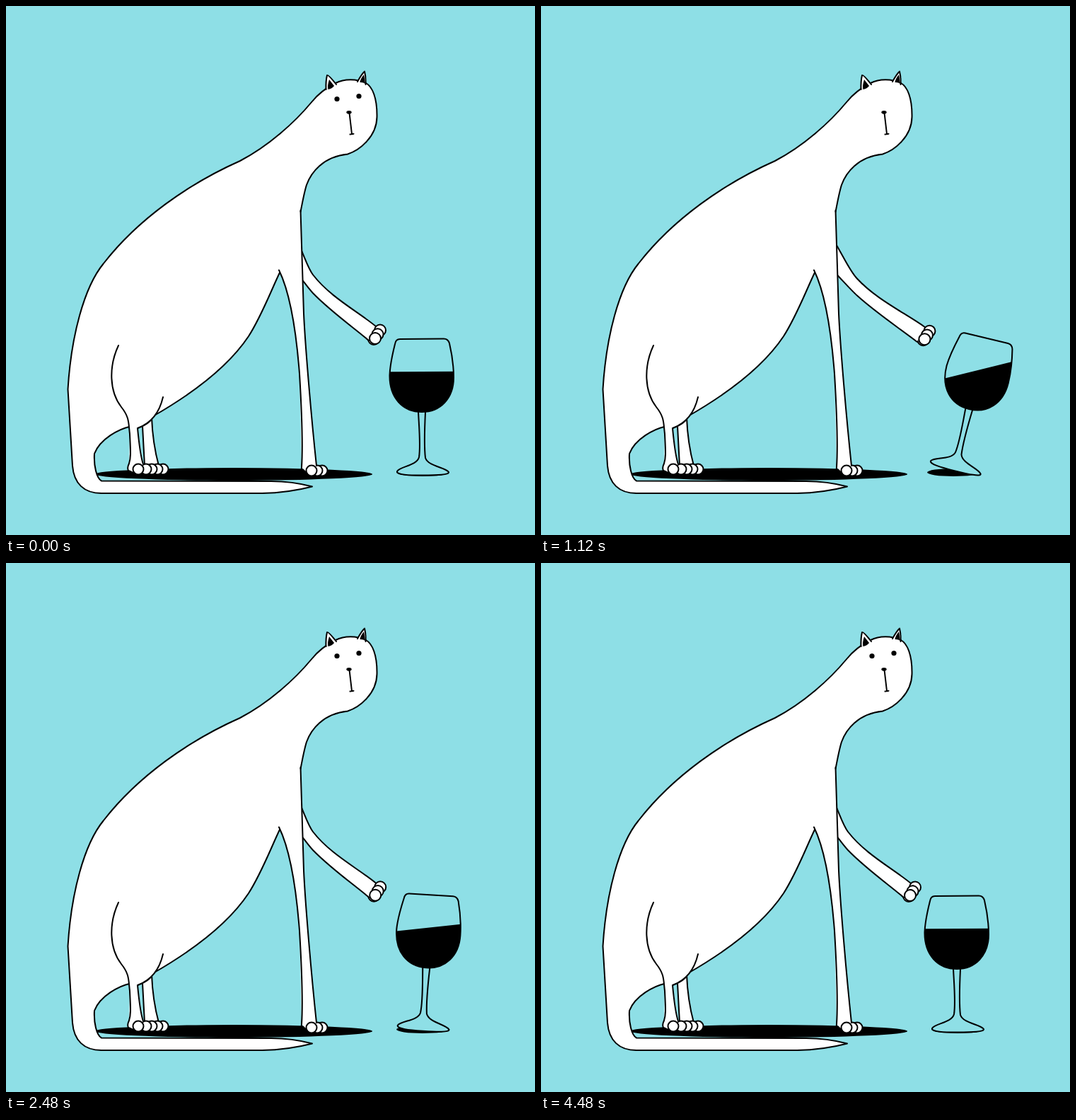
Write an HTML page that moves like this. It is 748 px wide and 748 px high and loops after 5200 ms.

```html
<!DOCTYPE html>
<html lang="en">
<head>
<meta charset="utf-8">
<title>Cat and glass</title>
<style>
  html, body { margin: 0; width: 100%; height: 100%; overflow: hidden; background: #8edfe6; }
  svg { display: block; width: 100vw; height: 100vh; }
  .line { fill: none; stroke: #000; stroke-width: 2; stroke-linecap: round; stroke-linejoin: round; }
  .white { fill: #fff; }
  .teal { fill: #8edfe6; }
  .bare { stroke: none; }
  .open { fill: none; }
</style>
</head>
<body>
<svg viewBox="0 0 748 748">
  <defs>
    <path id="bowl" d="M557 471 L619 470.5 Q625 470.5 627 477 C630 490 633 508 633 525 C633 555 614 574 588 574 C561 574 542 554 542.5 522 C543 506 547 490 550 478 Q551 471 557 471 Z"/>
    <clipPath id="inBowl"><use href="#bowl"/></clipPath>
    <path id="thigh" d="M159 480 C145 510 146 545 163 567 C175 582 173 590 175 605 C176 628 177 638 174 647 C169 657 175 663 186 662 M194 648 C190 636 188 618 186 597 C205 590 217 575 222 553"/>
    <path id="foreleg" d="M386 373.5 C400 402 410 455 415 520 C418 570 420 620 418 652 C417 661 421 664 430 664 M439 650 C432 585 423 480 421 435 L416.5 289"/>
  </defs>

  <ellipse cx="322" cy="662" rx="196" ry="9"/>
  <ellipse id="glassShadow" cx="589" cy="659.5" rx="37" ry="5.5"/>

  <g id="glass">
    <path class="line teal" d="M583 574 C584 595 586.5 622 584 638 C581 650 557 651 553 658 C552 663 570 663.5 589 663.5 C610 663.5 627 663 626 659 C621 652 597 651 593 639 C591 622 592 595 593 574"/>
    <use href="#bowl" class="line teal"/>
    <g clip-path="url(#inBowl)"><rect id="wine" x="500" y="517" width="180" height="90"/></g>
  </g>

  <g class="line white">
    <g id="palm"></g>
    <path id="arm"/>
    <g id="paw"></g>
  </g>

  <!-- far hind leg -->
  <path class="line white" d="M193 594 C194 612 195 630 196 650 L216 650 C210 628 207 608 206 582"/>
  <path id="body" class="line white"/>

  <g class="line white">
    <g id="hindToes"></g>
    <path class="bare" d="M159 480 C145 510 146 545 163 567 C175 582 173 590 175 605 L174 647 L172 655 L186 662 L194 648 L186 597 C205 590 217 575 222 553 Z"/>
    <use href="#thigh" class="open"/>
    <circle cx="187" cy="655" r="7.5"/>
  </g>

  <g class="line white">
    <g id="foreToes"></g>
    <path class="bare" d="M386 373.5 C400 402 410 455 415 520 L418 652 L430 664 L439 650 C432 585 423 480 421 435 L416.5 289 Z"/>
    <use href="#foreleg" class="open"/>
    <circle cx="432" cy="657" r="7.5"/>
  </g>

  <!-- ears and face -->
  <path class="line white" d="M452.5 118 Q452 106 454 98 Q456 97 467 111"/>
  <path class="line white" d="M497 107 Q503 96 507 92.5 Q509 100 508.5 111"/>
  <path d="M457 104 Q454 113 455.5 118 Q461 117 464 113 Z"/>
  <path d="M506 97 Q500.5 104 500.5 108 Q505 107.5 508 110 Z"/>
  <g id="eyes">
    <circle cx="468" cy="131.5" r="3.6"/>
    <circle cx="499" cy="127.5" r="3.6"/>
  </g>
  <ellipse cx="485" cy="150.3" rx="3.6" ry="2.4"/>
  <path class="line" d="M485.5 151 L489 181 M486.5 181.5 L491.5 180.7"/>
</svg>

<script>
const LOOP = 5200, STEP = 80, BLINK = 160;
const $ = id => document.getElementById(id);

// Turning points [time, value]; motion between them follows half a cosine.
const reach = [[80, 0], [700, 1.02], [1320, 0]];
const flick = [[1760, 0], [2020, -3], [2560, 0]];
const tilt = [[220, 0], [720, 19.5], [800, 19.5], [1840, -6.3], [2280, 8], [2740, -2.5], [3040, 0]];
const slide = [[700, 0], [1300, -7.5], [1800, -7.5], [2400, 0]];
const slosh = [[80, 0], [900, -14], [1020, -14.5], [1820, 12.5], [2340, -9], [2760, 4], [3300, 0]];
const wag = [[2960, 0], [3240, 8.5], [3740, -6.6], [4120, 4], [4340, 0]];
const blinks = [240, 1120, 3040, 4320];

// Shoulder, elbow and wrist on both edges of the arm, and the paw.
const rest = { top: [[414, 337], [434, 380], [523, 453]], low: [[414, 381], [434, 406], [513, 473]], paw: [522, 470] };
const out = { top: [[414, 314], [486, 401], [608, 459]], low: [[414, 357], [493, 425], [590, 480]], paw: [607, 475] };

function at(track, t) {
  const i = track.findIndex(k => k[0] > t);
  if (i === 0) return track[0][1];
  if (i < 0) return track[track.length - 1][1];
  const [t0, v0] = track[i - 1], [t1, v1] = track[i];
  return v0 + (v1 - v0) * (1 - Math.cos(Math.PI * (t - t0) / (t1 - t0))) / 2;
}

const mix = (a, b, k) => a.map((v, i) => v + (b[i] - v) * k);
const dist = (a, b) => Math.hypot(b[0] - a[0], b[1] - a[1]);
const text = pts => pts.map(p => p.map(v => v.toFixed(2)).join(' ')).join(' ');

function spin([x, y], deg, [cx, cy]) {
  const a = deg * Math.PI / 180, c = Math.cos(a), s = Math.sin(a);
  return [cx + (x - cx) * c - (y - cy) * s, cy + (x - cx) * s + (y - cy) * c];
}

function addToes(id, x, y, count, gap, r = 7.5) {
  for (let i = 0; i < count; i++) {
    const toe = document.createElementNS('http://www.w3.org/2000/svg', 'circle');
    toe.setAttribute('cx', x - i * gap[0]);
    toe.setAttribute('cy', y - i * gap[1]);
    toe.setAttribute('r', r);
    $(id).append(toe);
  }
}

// Two cubics with a shared direction at the elbow.
function bend([s, e, w]) {
  const a = dist(s, e), b = dist(e, w);
  const dir = [0, 1].map(i => (e[i] - s[i]) / a + (w[i] - e[i]) / b);
  const len = Math.hypot(...dir);
  const along = d => e.map((v, i) => v + dir[i] / len * d);
  return [s, mix(s, e, .4), along(-a * .25), e, along(b * .35), mix(e, w, .7), w];
}

function drawArm(p, turn) {
  const elbow = mix(mix(rest.top[1], rest.low[1], .5), mix(out.top[1], out.low[1], .5), p);
  const edge = side => {
    const [s, e, w] = rest[side].map((q, i) => mix(q, out[side][i], p));
    return bend([s, e, spin(w, turn, elbow)]);
  };
  const [start, ...low] = edge('low').reverse();
  const [shoulder, ...top] = edge('top');
  $('arm').setAttribute('d', `M${text([start])} C${text(low)} L${text([shoulder])} C${text(top)}`);
  const move = `translate(${spin(mix(rest.paw, out.paw, p), turn, elbow)})`;
  $('palm').setAttribute('transform', move);
  $('paw').setAttribute('transform', move);
}

function drawGlass(angle, dx, level) {
  const pivot = angle > 0 ? 616 : 562;
  $('glassShadow').setAttribute('transform', `translate(${dx} 0)`);
  $('glass').setAttribute('transform', `translate(${dx} 0) rotate(${angle} ${pivot} 667)`);
  $('wine').setAttribute('transform', `rotate(${level - angle - .4} 588 517)`);
}

function drawBody(w) {
  const y = (base, k) => (base + w * k).toFixed(2);
  $('body').setAttribute('d',
    'M416.5 291 C420 273 422 262 425 253 C431 236 448 213 483 209.5' +
    ' C500 204 524 185 524.5 157 C525 130 518 114 509 109 C496 102.5 478 102.5 466 109' +
    ' C452 116 440 126 432 136 C408 165 371 198 331 219 C259 251 187 301 138 364' +
    ' C110 398 92 468 87.5 542 L94 650 C96 675 110 689 135 689' +
    ` C220 689 300 ${y(689, .15)} 362 ${y(689, .3)} C390 ${y(688.5, .5)} 412 ${y(685, .8)} 433 ${y(679.5, 1)}` +
    ` C412 ${y(674, .6)} 392 ${y(672, .35)} 375 ${y(672, .3)} C300 ${y(672, .05)} 220 671.5 135 671.5` +
    ' C128 668 124 650 125 633 C133 612 160 598 176 594.5 L186 597 C200 592 206 586 208 580' +
    ' C262 549 313 512 343 467 C361 439 375 402 387 377');
}

function render(time) {
  const t = Math.floor(time % LOOP / STEP) * STEP;
  drawArm(at(reach, t), at(flick, t));
  drawGlass(at(tilt, t), at(slide, t), at(slosh, t));
  drawBody(at(wag, t));
  const shut = blinks.some(b => t >= b && t < b + BLINK);
  $('eyes').setAttribute('visibility', shut ? 'hidden' : 'visible');
}

addToes('hindToes', 222, 655, 4, [8, 0]);
addToes('foreToes', 447, 657, 2, [7, 0]);
addToes('palm', -2, 1, 1, [0, 0], 8);
addToes('paw', 7, -11.5, 3, [3.5, -5.75], 8);

const start = performance.now();
function tick() {
  render(performance.now() - start);
  requestAnimationFrame(tick);
}
tick();
</script>
</body>
</html>
```
